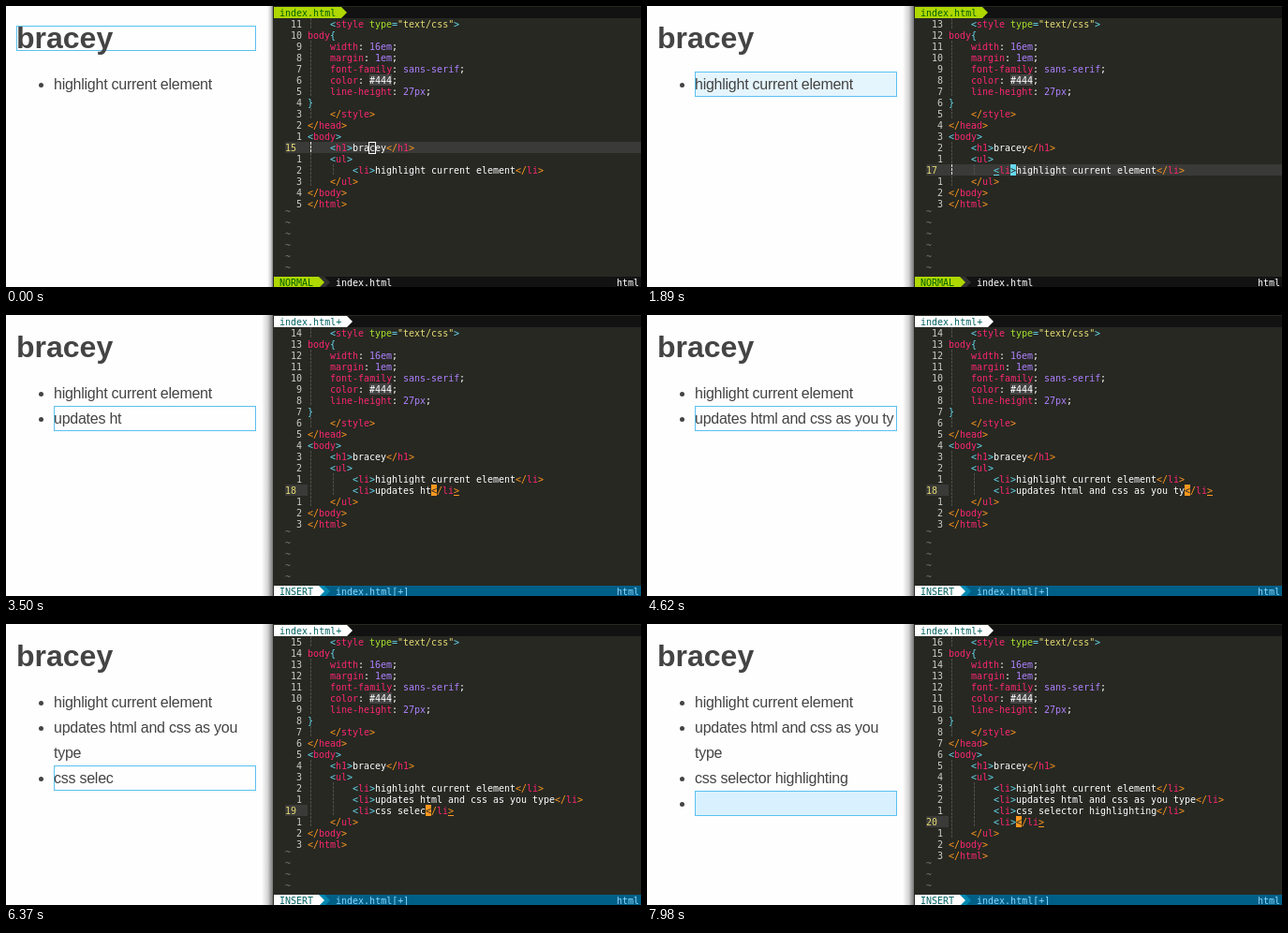
Write an HTML page that moves like this. It is 678 px wide and 300 px high and loops after 8 s.

```html
<!DOCTYPE html>
<html lang="en">
<head>
<meta charset="utf-8">
<title>Live preview</title>
<style>
html, body { margin: 0; width: 100%; height: 100%; overflow: hidden; background: #fefefe; }
svg { display: block; }
text { white-space: pre; }
.page { font: 16px "Liberation Sans", Arial, sans-serif; letter-spacing: -.25px; fill: #444; }
.title { font-size: 32px; font-weight: bold; letter-spacing: 0; }
.code { font: 10px "DejaVu Sans Mono", monospace; }
</style>
</head>
<body>
<svg id="stage" width="678" height="300" viewBox="0 0 678 300">
  <defs>
    <linearGradient id="shadow">
      <stop offset="0" stop-color="#000" stop-opacity="0"/>
      <stop offset=".5" stop-color="#000" stop-opacity=".17"/>
      <stop offset="1" stop-color="#000" stop-opacity=".6"/>
    </linearGradient>
  </defs>
  <g id="scene"></g>
</svg>
<script>
const LOOP = 8000, TICK = 70;
const CELL = 6, ROW = 12, LEFT = 286, TEXT_X = 322;
const BG = '#272822', WHITE = '#fff', PINK = '#f92672', CYAN = '#66d9ef',
      ORANGE = '#fd971f', PURPLE = '#ae81ff', GREEN = '#a6e22e', YELLOW = '#e6db74';
const FIRST_LINE = 4;

// Ticks at which something happens
const FOCUS = 7, TO_LIST = 21, TO_ITEM = 25, OPEN_LINE = 31, ITEM2 = 36, TYPE2 = 43,
      LEAVE2 = 69, ITEM3 = 77, TYPE3 = 84, LEAVE3 = 105, ITEM4 = 113;
const FLASHES = [TO_LIST, TO_ITEM, OPEN_LINE, ITEM2, TYPE2, ITEM3, TYPE3, ITEM4];
const FLASH_LEVELS = [.25, 1, .65, .3];

const esc = s => s.replace(/&/g, '&amp;').replace(/</g, '&lt;').replace(/>/g, '&gt;');
const rect = (x, y, w, h, fill, extra = '') =>
  `<rect x="${x}" y="${y}" width="${w}" height="${h}" fill="${fill}" ${extra}/>`;
const rowTop = row => 1 + row * ROW;
const arrow = (x, y, fill) => `<path d="M${x} ${y}l6 6l-6 6z" fill="${fill}"/>`;

// Words are placed on the cell grid one by one
const code = (x, row, str, fill, baseline = 10) => [...str.matchAll(/\S+/g)].map(m =>
  `<text class="code" x="${x + m.index * CELL}" y="${rowTop(row) + baseline}" fill="${fill}">${esc(m[0])}</text>`).join('');

const openTag = name => [['<', CYAN], [name, PINK], ['>', CYAN]];
const closeTag = name => [['</', ORANGE], [name, PINK], ['>', ORANGE]];
const element = (name, str) => [...openTag(name), [str, WHITE], ...closeTag(name)];
const line = (indent, tokens) => ({ indent, tokens });
const rule = (prop, value) => line(4, [[prop, PINK], [': ', WHITE], [value, PURPLE], [';', WHITE]]);

const HEAD = [
  line(4, [['<', CYAN], ['style ', PINK], ['type', GREEN], ['=', CYAN], ['"text/css"', YELLOW], ['>', CYAN]]),
  line(0, [['body', PINK], ['{', CYAN]]),
  rule('width', '16em'),
  rule('margin', '1em'),
  rule('font-family', 'sans-serif'),
  line(4, [['color', PINK], [': ', WHITE], ['#444', WHITE, '#444'], [';', WHITE]]),
  rule('line-height', '27px'),
  line(0, [['}', CYAN]]),
  line(4, closeTag('style')),
  line(0, closeTag('head')),
  line(0, openTag('body')),
  line(4, element('h1', 'bracey')),
  line(4, openTag('ul'))
];
const TAIL = [line(4, closeTag('ul')), line(0, closeTag('body')), line(0, closeTag('html'))];

const typed = (str, chars) => str.slice(0, Math.max(0, Math.floor(chars)));

function stateAt(tick) {
  const items = ['highlight current element'];
  if (tick >= ITEM2) items.push(typed('updates html and css as you type', 1.25 * (tick - TYPE2 + 1)));
  if (tick >= ITEM3) items.push(typed('css selector highlighting', 1.25 * (tick - TYPE3 + 1) - .2));
  if (tick >= ITEM4) items.push('');
  const blank = tick >= OPEN_LINE && tick < ITEM2;
  const insert = tick >= OPEN_LINE && tick < LEAVE2 || tick >= ITEM3 && tick < LEAVE3 || tick >= ITEM4;

  const lines = [...HEAD, ...items.map(s => line(8, element('li', s)))];
  if (blank) lines.push(line(8, []));
  const last = lines.length - 1;
  lines.push(...TAIL);

  let row = 11, col = 11, match = -1, target = 'h1';
  if (tick >= TO_LIST) { row = 12; col = 7; match = 4; target = 'ul'; }
  if (tick >= TO_ITEM) { row = 13; col = 11; match = 8; target = 'li'; }
  if (tick >= OPEN_LINE) {
    const length = items[items.length - 1].length;
    row = last;
    col = blank ? 8 : 12 + length - (insert ? 0 : 1);
    match = insert && !blank ? col + 4 : -1;
    target = blank ? 'ul' : 'li';
  }
  const start = FLASHES.filter(f => f <= tick).pop();
  return { items, lines, row, col, match, target, insert,
           focused: tick >= FOCUS, modified: tick >= OPEN_LINE, flash: FLASH_LEVELS[tick - start] || 0 };
}

const label = (x, y, str, kind = '') => `<text class="page ${kind}" x="${x}" y="${y}">${str}</text>`;

function page({ items, target, flash }) {
  let y = 70, text = label(11, 45, 'bracey', 'title');
  let box = [11, 21, 27];
  for (const item of items) {
    // The preview column fits "... you ty" and wraps one letter later
    const rows = item.length > 30 ? [item.slice(0, 27), item.slice(28)] : [item];
    text += `<circle cx="37.5" cy="${y + 14.5}" r="2.5" fill="#444"/>`;
    rows.forEach((s, i) => text += label(51, y + 19 + 27 * i, s));
    if (target === 'li') box = [51, y, 27 * rows.length];
    y += 27 * rows.length;
  }
  if (target === 'ul') box = [11, 70, y - 70];
  const [x, top, height] = box;
  return rect(0, 0, 286, 300, '#fefefe') +
    rect(x + .5, top + .5, 266 - x, height - 1, '#d9f1fe', `fill-opacity="${flash}" stroke="#5bc0f0"`) + text;
}

function codeLine({ indent, tokens }, index, s) {
  const row = index + 1, y = rowTop(row), current = index === s.row;
  const number = String(current ? FIRST_LINE + index : Math.abs(index - s.row));
  let out = '', col = indent, cell = [' ', WHITE];
  if (current) out += rect(298, y, s.insert ? 24 : 380, ROW, '#3a3a38');
  out += current ? code(298, row, number, YELLOW) : code(316 - number.length * CELL, row, number, '#ccccc8');
  for (let g = 0; g < indent; g += 4) {
    const x = TEXT_X + g * CELL + 3.5;
    out += `<path d="M${x} ${y}v12" stroke="${current && !s.insert && !g ? '#e4e4de' : '#4e4f48'}" stroke-dasharray="3 1"/>`;
  }
  for (const [str, fill, back] of tokens) {
    const x = TEXT_X + col * CELL;
    if (back) out += rect(x, y, str.length * CELL, ROW, back);
    out += code(x, row, str, fill);
    if (current && s.col >= col && s.col < col + str.length) cell = [str[s.col - col], fill];
    if (current && s.match >= col && s.match < col + str.length)
      out += rect(TEXT_X + s.match * CELL, y + 11, CELL, 1, fill);
    col += str.length;
  }
  if (current) {
    const x = TEXT_X + s.col * CELL;
    out += s.focused
      ? rect(x, y, CELL, ROW, cell[1]) + code(x, row, cell[0], BG)
      : rect(x - .5, y + .5, 7, 12, 'none', 'stroke="#fff"');
  }
  return out;
}

function bars({ insert, modified }) {
  const tab = modified ? ['#fff', '#005f5f', 'index.html+'] : ['#afd700', '#005f00', 'index.html'];
  const tabEnd = 298 + tab[2].length * CELL;
  const [back, ink, mid, base, name] = insert
    ? ['#fff', '#005f5f', '#0087af', '#005f87', '#87d7ff']
    : ['#afd700', '#005f00', '#303030', '#121212', '#fff'];
  const y = rowTop(24);
  return rect(LEFT, 1, 392, ROW, '#121212') + rect(LEFT, 1, tabEnd - LEFT, ROW, tab[0]) +
    arrow(tabEnd, 1, tab[0]) + code(292, 0, tab[2], tab[1]) +
    rect(LEFT, y, 392, ROW, base) + rect(LEFT, y, 54, ROW, mid) + arrow(340, y, mid) +
    rect(LEFT, y, 48, ROW, back) + arrow(334, y, back) +
    code(292, 24, insert ? 'INSERT' : 'NORMAL', ink) +
    code(352, 24, modified ? 'index.html[+]' : 'index.html', name) + code(652, 24, 'html', name);
}

function editor(s) {
  const shadowWidth = s.focused ? 13 : 7;
  let out = rect(LEFT - shadowWidth, 0, shadowWidth, 300, 'url(#shadow)') + rect(285, 0, 393, 300, BG);
  s.lines.forEach((l, i) => out += codeLine(l, i, s));
  for (let row = s.lines.length + 1; row < 24; row++) out += code(298, row, '~', '#77776e', 6);
  return out + bars(s);
}

const scene = document.getElementById('scene');
let shown = -1;
function draw(now) {
  const tick = Math.floor((now % LOOP) / TICK);
  if (tick !== shown) {
    const s = stateAt(tick);
    scene.innerHTML = page(s) + editor(s);
    shown = tick;
  }
}

const began = performance.now();
function loop() {
  draw(performance.now() - began);
  requestAnimationFrame(loop);
}
loop();
</script>
</body>
</html>
```
